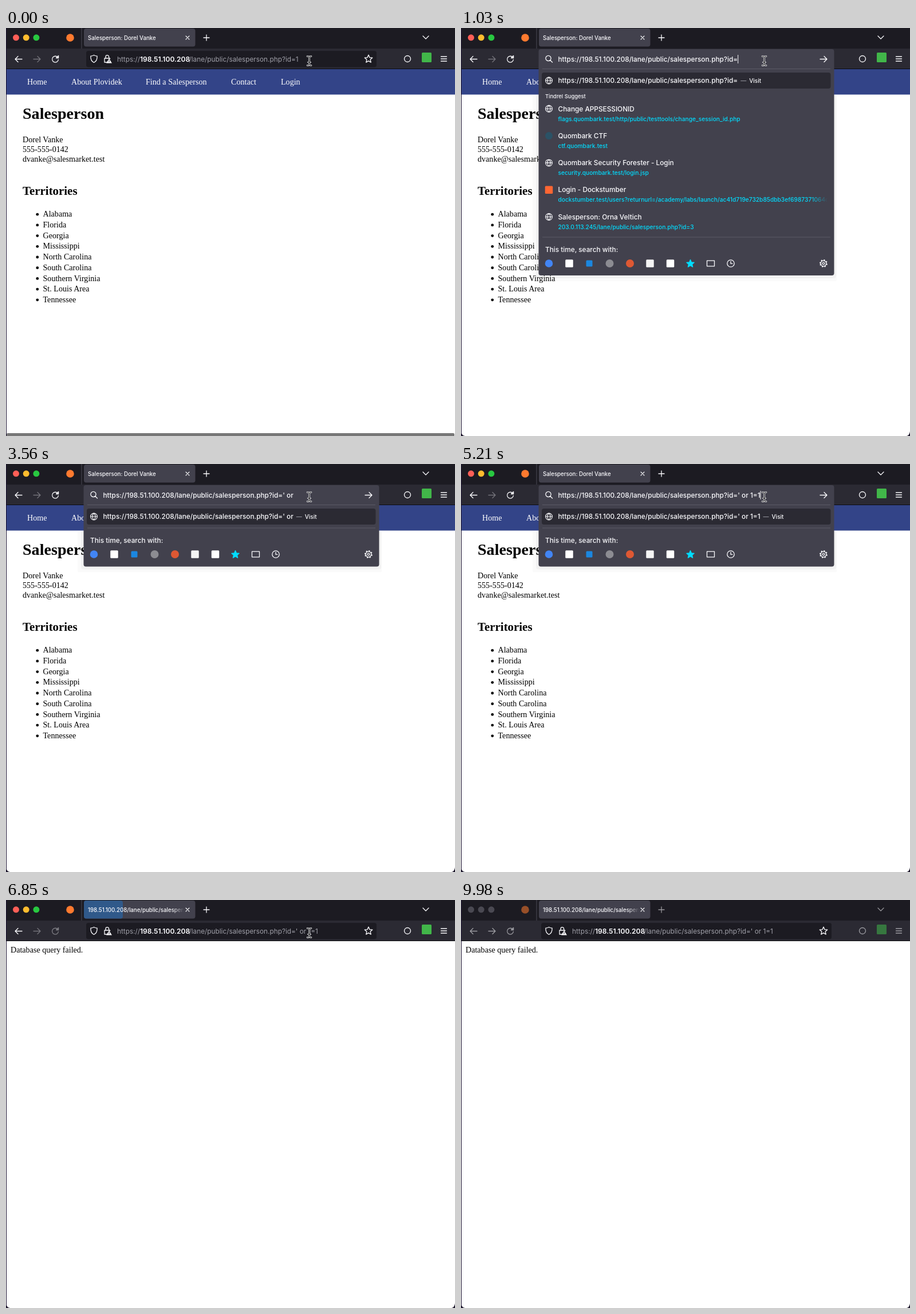
Animation of 784x714 px, one loop 10 s. Source, as an HTML page:

```html
<!DOCTYPE html>
<html lang="en">
<head>
<meta charset="utf-8">
<title>Salesperson</title>
<style>
  html, body { margin: 0; width: 100%; height: 100%; overflow: hidden; background: #fff; }
  svg { display: block; }
  text { white-space: pre; font-family: Inter, "Open Sans", sans-serif; font-weight: 500; }
  .regular { font-weight: 400; }
  .bold { font-weight: 600; }
  .serif { font-family: "Liberation Serif", "Times New Roman", serif; font-weight: 400; }
  .heading { font-weight: 700; }
</style>
</head>
<body>
<svg id="stage" width="784" height="714" viewBox="0 0 784 714"></svg>
<script>
const stage = document.getElementById('stage');
const LOOP = 10000, UI = 11.8, LIGHT = '#fbfbfe', GREY = '#9f9fa8', PANEL = '#42414d', DARK = '#1c1b22';
const SCHEME = 'https://', HOST = '198.51.100.208', PATH = '/lane/public/salesperson.php?id=';
const ADDRESS = SCHEME + HOST + PATH;
const INJECTED = "' or 1=1";

// [start, text after "id=", caret visible]
const typing = [
  [1030, '', 1], [1780, "'", 1], [2370, "'", 0], [2820, "' ", 1], [3270, "' o", 1],
  [3410, "' or", 1], [3560, "' or", 0], [4010, "' or ", 1], [4610, "' or 1", 1],
  [5060, "' or 1=", 1], [5210, INJECTED, 1], [5800, INJECTED, 0]
];

const suggestions = [
  ['Change APPSESSIONID', 'flags.quombark.test/http/public/testtools/change_session_id.php', 'globe'],
  ['Quombark CTF', 'ctf.quombark.test', 'teal'],
  ['Quombark Security Forester - Login', 'security.quombark.test/login.jsp', 'globe'],
  ['Login - Dockstumber', 'dockstumber.test/users?returnurl=/academy/labs/launch/ac41d719e732b85dbb3ef6987371064c92', 'orange'],
  ['Salesperson: Orna Veltich', '203.0.113.245/lane/public/salesperson.php?id=3', 'globe']
];

const territories = ['Alabama', 'Florida', 'Georgia', 'Mississippi', 'North Carolina',
  'South Carolina', 'Southern Virginia', 'St. Louis Area', 'Tennessee'];

const ruler = document.createElement('canvas').getContext('2d');
const textWidth = s => {
  ruler.font = `500 ${UI}px Inter, "Open Sans", sans-serif`;
  return ruler.measureText(s).width;
};

const text = (x, y, s, size = UI, fill = LIGHT, style = '') =>
  `<text x="${x}" y="${y}" font-size="${size}" fill="${fill}" class="${style}">${s}</text>`;
const serif = (x, y, s, size = 14.1, fill = '#000', style = '') => text(x, y, s, size, fill, 'serif ' + style);
const rect = (x, y, w, h, fill, r = 0, extra = '') =>
  `<rect x="${x}" y="${y}" width="${w}" height="${h}" rx="${r}" fill="${fill}" ${extra}/>`;
const disc = (x, y, r, fill) => `<circle cx="${x}" cy="${y}" r="${r}" fill="${fill}"/>`;
const square = (x, y, size, fill) => rect(x - size / 2, y - size / 2, size, size, fill, 1.5);
const icon = (x, y, d, style = '') =>
  `<path transform="translate(${x} ${y})" d="${d}" fill="none" stroke="${LIGHT}" stroke-width="1.3" stroke-linecap="round" stroke-linejoin="round" style="${style}"/>`;
const dim = (body, opacity) => `<g opacity="${opacity}">${body}</g>`;
const ring = r => `M${-r} 0A${r} ${r} 0 1 1 ${r} 0A${r} ${r} 0 1 1 ${-r} 0`;

const starPath = r => 'M' + Array.from({ length: 10 }, (_, i) => {
  const a = i * Math.PI / 5, q = i % 2 ? r * 0.46 : r;
  return `${(q * Math.sin(a)).toFixed(2)} ${(-q * Math.cos(a)).toFixed(2)}`;
}).join('L') + 'Z';

const BACK = 'M6 0H-6M-1 -5L-6 0L-1 5';
const FORWARD = 'M-6 0H6M1 -5L6 0L1 5';
const SHIELD = 'M0 -6.5Q3 -4.8 5.6 -4.8Q6 3.5 0 6.5Q-6 3.5 -5.6 -4.8Q-3 -4.8 0 -6.5Z';
const GLOBE = ring(5.9) + 'M-5.9 0H5.9M0 -5.9Q-5.5 0 0 5.9Q5.5 0 0 -5.9';
const IBEAM = 'M-3.5 -8Q0 -8 0 -6Q0 -8 3.5 -8M0 -6V6M-3.5 8Q0 8 0 6Q0 8 3.5 8M-2 2.5H2';

function favicon(kind, y) {
  if (kind === 'globe') return icon(153.5, y, GLOBE, 'stroke-width:1.1');
  return kind === 'teal' ? disc(153.5, y, 6.5, '#2b5266') : square(153.5, y, 13.5, '#ff6633');
}

function salesPage() {
  const nav = [[37, 'Home'], [114, 'About Plovidek'], [244, 'Find a Salesperson'], [393, 'Contact'], [480, 'Login']];
  const person = ['Dorel Vanke', '555-555-0142', 'dvanke@salesmarket.test'];
  return rect(1, 72, 783, 44.5, '#334488') +
    nav.map(([x, s]) => serif(x, 99, s, 14.1, '#fff')).join('') +
    serif(29, 158.8, 'Salesperson', 28.1, '#000', 'heading') +
    person.map((s, i) => serif(29, 200.3 + i * 17, s)).join('') +
    serif(29, 291.5, 'Territories', 20.9, '#000', 'heading') +
    territories.map((s, i) => disc(54.8, 326.2 + i * 18.7, 2.4, '#000') + serif(64.5, 330.3 + i * 18.7, s)).join('');
}

const failedPage = () => serif(8, 91.5, 'Database query failed.');

const windowBottom = t => t < 440
  ? rect(1, 709, 782, 6, '#777', 2)
  : '<path d="M0 706Q1 713 7 714H0ZM784 706Q783 713 778 714H784Z" fill="#1a1428"/>';

function chrome(t, loaded) {
  const inactive = t >= 9980, loading = t >= 6400 && t < 7440;
  const lights = inactive ? Array(3).fill('#4a4952') : ['#ff5f57', '#febc2e', '#28c840'];
  const burst = t >= 6700 && t < 7140;
  const grow = Math.floor((t - 6700) / 148);
  const title = loaded ? HOST + '/lane/public/salesperson.php' : 'Salesperson: Dorel Vanke';
  return rect(0, 0, 784, 36, DARK) + rect(0, 36, 784, 36, '#2b2a33') + rect(0, 71, 784, 1, '#0c0c0f') +
    rect(0, 0, 1, 714, '#1d1533') + rect(131.5, 0, 1, 36, '#4b4a55') +
    lights.map((c, i) => disc(17.5 + i * 17.7, 16.8, 5.5, c)).join('') +
    rect(136, 1, 194.5, 31.5, PANEL, 4) +
    (burst ? rect(136, 1, 34 * 2 ** grow, 31.5, '#30598a', 4, `opacity="${grow > 1 ? 0.5 : 1}"`) : '') +
    `<svg width="312" height="36">${text(143, 21, title, 9.7)}` +
    (loaded ? rect(290, 4, 22, 25, 'url(#fade)') : '') + '</svg>' +
    icon(317, 17, 'M-3 -3L3 3M3 -3L-3 3', 'stroke-width:1.1') +
    dim(
      disc(112, 17, 6.8, '#ff7a2f') +
      icon(350, 17, 'M-5 0H5M0 -5V5') + icon(733, 16.5, 'M-5 -2.5L0 2.5L5 -2.5') +
      icon(22, 54.5, BACK) + dim(icon(54, 54.5, FORWARD), inactive ? 1 : 0.35) +
      dim(icon(86, 54.5, 'M4.2 -3.3A5.4 5.4 0 1 0 5.4 1M5.6 -6V-2H1.6Z'), loading ? 0.4 : 1) +
      icon(701, 54, ring(5.5)) + square(734.5, 51.5, 17, '#41b649') +
      icon(764.5, 54, 'M-5 -4H5M-5 0H5M-5 4H5'),
      inactive ? 0.55 : 1);
}

const identityIcons = () => icon(153.5, 54, SHIELD) +
  icon(177, 54, 'M-3 -1V-3.5A2.8 2.8 0 0 1 2.6 -3.5V-1M-0.5 6H-5V-1H4.5V0') +
  `<path d="M180 53.5L185 61.5H175Z" fill="${LIGHT}"/>` + rect(179.5, 56.5, 1, 3, DARK);

const bookmarkStar = () => icon(633, 54.3, starPath(7.2));

function closedAddress(suffix) {
  return rect(140, 40, 507, 28.5, DARK, 4) + identityIcons() + bookmarkStar() +
    text(194, 58.8, SCHEME, UI, GREY, 'regular') +
    text(234, 58.8, HOST, 12.1, LIGHT, 'bold') +
    text(319.5, 58.8, PATH + suffix, UI, GREY, 'regular');
}

function engines(y) {
  const line = rect(142, y - 22.5, 503, 1, '#5b5a66');
  const marks = [
    disc(153.5, y + 24, 6.8, '#4285f4'), square(189, y + 24, 13.5, '#fff'), square(224, y + 24, 11, '#1b87e0'),
    disc(259.5, y + 24, 7, '#8c8c92'), disc(295, y + 24, 7, '#de5833'), square(330, y + 24, 13.5, '#f4f4f4'),
    square(365.5, y + 24, 13.5, '#fff'),
    icon(400.5, y + 24.5, starPath(7), 'fill:#00ddff;stroke:#00ddff'),
    icon(436, y + 24, 'M-6.5 -4.8H6.5V4.8H-6.5Z'), icon(471, y + 24, ring(6.2) + 'M0 -3.5V0.3H3'),
    icon(633, y + 24, ring(4.8) + ring(1.8)),
    icon(633, y + 24, ring(6), 'stroke-width:1.8;stroke-dasharray:2.3 2.41;stroke-linecap:butt')
  ];
  return line + text(147, y + 4.2, 'This time, search with:') + marks.join('');
}

const suggestionList = top => suggestions.map(([name, link, kind], i) => {
  const y = top + i * 47.3;
  return favicon(kind, y) + text(169.5, y + 4.2, name) +
    `<svg width="640" height="714">${text(169.5, y + 21.2, link, 10.2, '#00ddff')}</svg>`;
}).join('') + rect(610, top + 3 * 47.3 + 8, 30, 20, 'url(#fade)');

function panel(bottom, body) {
  return rect(125, 117, 531, bottom + 10 - 117, '#000', 2, 'opacity="0.02"') +
    rect(131, 117, 524, bottom + 5 - 117, '#000', 4, 'opacity="0.03"') +
    rect(135.5, 37, 516, bottom - 37, PANEL, 4) + rect(142, 71, 503, 1, '#5b5a66') + body;
}

const caretAt = (x, visible) => visible ? rect(x.toFixed(1), 47, 1, 15, LIGHT) : '';

function focusedPanel(t) {
  const selected = t < 590, full = ADDRESS + '1', w = textWidth(full);
  return panel(415.5,
    identityIcons() + bookmarkStar() +
    (selected ? rect(194, 47, w, 15, '#44688d') : '') + text(194, 58.8, full) + caretAt(194 + w, !selected) +
    disc(153.5, 92, 6.8, '#4285f4') + text(169.5, 96.2, 'Search with Fendro') +
    suggestionList(123.7) + engines(370.5));
}

function typingPanel(t) {
  const [, suffix, caret] = typing.filter(step => step[0] <= t).pop();
  const long = t < 1180, typed = ADDRESS + suffix, row = typed.trim(), end = 169.5 + textWidth(row);
  return panel(long ? 433 : 179.5,
    icon(152.5, 53, ring(4.6) + 'M3.4 3.4L7 7') + icon(633, 54.5, FORWARD) +
    text(169.5, 58.8, typed) + caretAt(169.5 + textWidth(typed), caret) +
    rect(141, 78, 504.5, 28, '#2b2a33', 4) + favicon('globe', 92) + text(169.5, 96.2, row) +
    text(end + 5, 95.7, '—', 10, GREY) + text(end + 20, 95.7, 'Visit', 10) +
    (long ? text(147, 122.5, 'Tindrel Suggest', 9.4) + suggestionList(141.3) : '') +
    engines(long ? 388 : 134));
}

function pointer(t) {
  if (t >= 9380) return '';
  const p = t < 8790 ? 0 : Math.min(1, (Math.floor((t - 8790) / 147) + 1) / 4);
  const x = 529.5 + 108.5 * p, y = 57.5 + 494.5 * p;
  if (p) return `<path transform="translate(${x} ${y})" d="M0 0V15L3.5 11.7L6 17L8.5 16L6 10.8H11Z" fill="#000" stroke="#fff"/>`;
  return icon(x, y, IBEAM, 'stroke-width:2.6') + icon(x, y, IBEAM, 'stroke:#000;stroke-width:1');
}

function view(t) {
  const loaded = t >= 6700;
  const address = t < 150 ? closedAddress('1') : t < 1030 ? focusedPanel(t) :
    t < 6400 ? typingPanel(t) : closedAddress(INJECTED);
  return `<defs><linearGradient id="fade"><stop stop-color="${PANEL}" stop-opacity="0"/><stop offset="1" stop-color="${PANEL}"/></linearGradient></defs>` +
    rect(0, 0, 784, 714, '#fff') + (loaded ? failedPage() : salesPage()) + windowBottom(t) +
    chrome(t, loaded) + address + pointer(t);
}

const start = performance.now();
let shown = '';
function frame() {
  const markup = view((performance.now() - start) % LOOP);
  if (markup !== shown) stage.innerHTML = shown = markup;
  requestAnimationFrame(frame);
}
frame();
</script>
</body>
</html>
```
